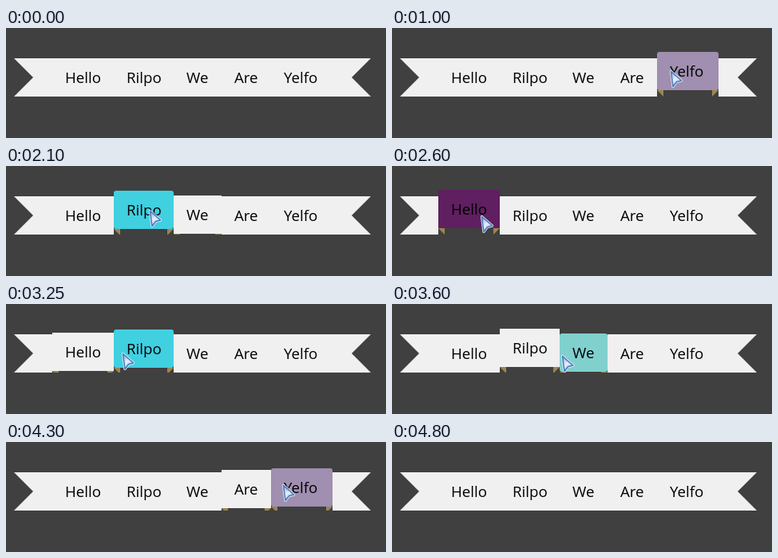
Write an HTML page with a canvas that moves like this. It is 476 px wide and 138 px high and loops after 4.85 s.

```html
<!DOCTYPE html>
<html lang="en">
<head>
<meta charset="utf-8">
<title>Ribbon menu</title>
<style>
  html, body { margin: 0; width: 100%; height: 100%; overflow: hidden; background: #404040; }
  canvas { display: block; }
</style>
</head>
<body>
<canvas id="stage" width="476" height="138"></canvas>
<script>
const ctx = document.getElementById('stage').getContext('2d');
const LOOP = 4850, STEP = 50, TRANSITION = 200;
const TOP = 38, BOTTOM = 86, LIFT = 8;
const PAGE = '#404040', PAPER = '#f0f0f0', FOLD = '#9b8651';

const tabs = [
  { label: 'Hello', x: 58, w: 77, color: '#5f1f60' },
  { label: 'Rilpo', x: 135, w: 75, color: '#40d0e0' },
  { label: 'We', x: 210, w: 60, color: '#80d0ce' },
  { label: 'Are', x: 270, w: 62, color: '#b08050' },
  { label: 'Yelfo', x: 332, w: 77, color: '#a08fb0' }
];

// [start time, hovered tab]; -1 means none
const hovers = [
  [475, 4], [1120, 3], [1595, 2], [1975, 1], [2430, 0],
  [3150, 1], [3575, 2], [3925, 3], [4225, 4], [4655, -1]
];

// [time, x, y] of the pointer tip
const path = [
  [50, 414, 128], [350, 414, 128], [450, 388, 88], [500, 372, 66], [650, 362, 53],
  [950, 362, 53], [1000, 348, 53], [1100, 335, 52], [1300, 295, 52],
  [1450, 295, 52], [1550, 274, 52], [1600, 251, 52], [1750, 236, 54],
  [1900, 236, 54], [2000, 198, 55], [2150, 170, 55],
  [2300, 170, 55], [2450, 130, 59], [2600, 111, 62],
  [3000, 111, 62], [3150, 136, 64], [3250, 145, 61], [3450, 180, 62],
  [3550, 180, 62], [3600, 212, 64], [3750, 269, 63],
  [3900, 269, 63], [3950, 290, 52], [4100, 321, 53],
  [4200, 321, 53], [4250, 338, 53], [4400, 362, 53],
  [4500, 362, 53], [4550, 362, 52], [4650, 362, 52], [4700, 368, 95]
];

// cubic-bezier(.25, .1, .25, 1)
function ease(p) {
  if (p <= 0) return 0;
  if (p >= 1) return 1;
  const bezier = (a, b, u) => 3 * a * u * (1 - u) ** 2 + 3 * b * u * u * (1 - u) + u ** 3;
  let lo = 0, hi = 1;
  for (let i = 0; i < 24; i++) {
    const mid = (lo + hi) / 2;
    if (bezier(0.25, 0.25, mid) < p) lo = mid; else hi = mid;
  }
  return bezier(0.1, 1, lo);
}

function polygon(points, color) {
  ctx.beginPath();
  points.forEach(([x, y]) => ctx.lineTo(x, y));
  ctx.closePath();
  ctx.fillStyle = color;
  ctx.fill();
}

function liftOf(index, t) {
  let amount = 0;
  hovers.forEach(([start, tab], i) => {
    if (tab !== index) return;
    amount += ease((t - start) / TRANSITION) - ease((t - hovers[i + 1][0]) / TRANSITION);
  });
  return Math.round(amount * LIFT);
}

function drawTab(tab, lift, hovered) {
  const { x, w } = tab, right = x + w, base = BOTTOM - lift;
  ctx.fillStyle = PAGE;
  ctx.fillRect(x, TOP - lift, w, BOTTOM - TOP + lift);

  ctx.save();
  ctx.beginPath();
  ctx.rect(x, base, w, lift);
  ctx.clip();
  polygon([[x, base], [x + 8, base], [x + 8, base + 8]], FOLD);
  polygon([[right, base], [right - 8, base], [right - 8, base + 8]], FOLD);
  ctx.restore();

  ctx.fillStyle = hovered ? tab.color : PAPER;
  ctx.beginPath();
  ctx.roundRect(x, TOP - lift, w, BOTTOM - TOP, hovered ? 3 : 0);
  ctx.fill();

  ctx.fillStyle = '#000';
  ctx.fillText(tab.label, x + 16, 69 - lift);
}

function drawPointer(t) {
  if (t < path[0][0] || t > path[path.length - 1][0]) return;
  const next = Math.max(1, path.findIndex(key => key[0] >= t));
  const [t0, x0, y0] = path[next - 1], [t1, x1, y1] = path[next];
  const p = (t - t0) / (t1 - t0);

  ctx.save();
  ctx.translate(Math.round(x0 + (x1 - x0) * p), Math.round(y0 + (y1 - y0) * p));
  const fill = ctx.createLinearGradient(2, 4, 11, 18);
  fill.addColorStop(0, '#8fb2e2');
  fill.addColorStop(0.5, '#e6effc');
  fill.addColorStop(1, '#b4cdf0');
  const arrow = new Path2D('M1.5 1.5 L14.5 13 L8.5 14.5 L4 20.5 Z');
  ctx.lineJoin = 'round';
  ctx.strokeStyle = 'rgba(225,236,252,.85)';
  ctx.lineWidth = 3.4;
  ctx.stroke(arrow);
  ctx.fillStyle = fill;
  ctx.fill(arrow);
  ctx.strokeStyle = '#4a78ba';
  ctx.lineWidth = 1.5;
  ctx.stroke(arrow);
  ctx.restore();
}

function draw(t) {
  ctx.fillStyle = PAGE;
  ctx.fillRect(0, 0, 476, 138);
  polygon([[10, TOP], [457, TOP], [433, 62], [457, BOTTOM], [10, BOTTOM], [34, 62]], PAPER);

  ctx.font = '18.7px "Open Sans", "Noto Sans", sans-serif';
  const current = hovers.filter(([start]) => start <= t).pop();
  const active = current ? current[1] : -1;
  tabs.forEach((tab, i) => drawTab(tab, liftOf(i, t), i === active));
  drawPointer(t);
}

const begin = performance.now();
function frame() {
  const t = (performance.now() - begin) % LOOP;
  draw(Math.floor(t / STEP) * STEP);
  requestAnimationFrame(frame);
}
frame();
</script>
</body>
</html>
```
